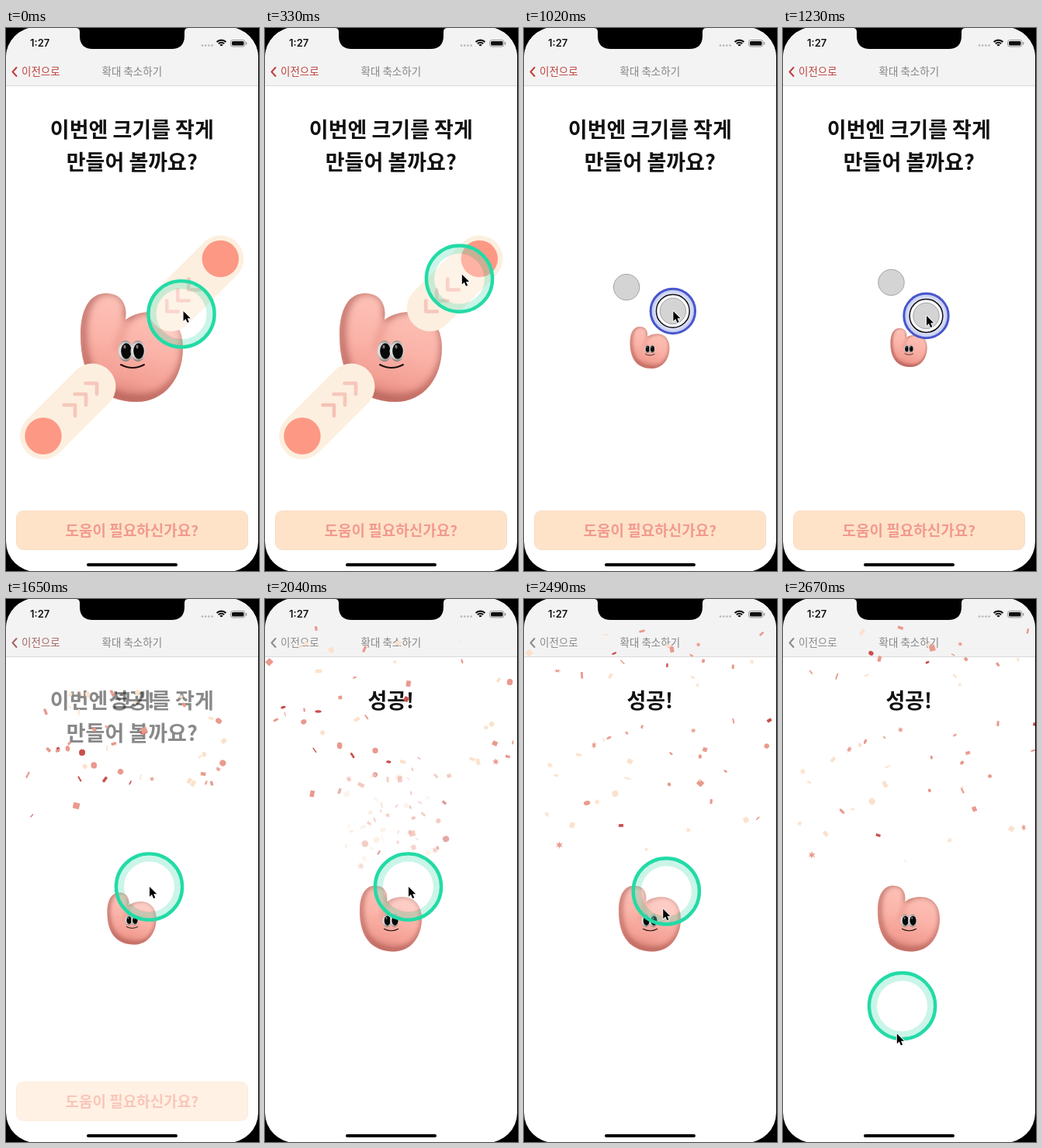
These frames come from a looping animation (326 by 700 pixels, 2.7 s). An HTML page with a canvas:

```html
<!DOCTYPE html>
<html lang="ko">
<head>
<meta charset="utf-8">
<style>
html, body { margin: 0; width: 100%; height: 100%; overflow: hidden; background: #000; }
canvas { display: block; }
</style>
</head>
<body>
<canvas id="stage" width="326" height="700"></canvas>
<script>
const ctx = document.getElementById('stage').getContext('2d');
const LOOP = 2700, TAU = Math.PI * 2;
const KOREAN = '"Noto Sans CJK KR", "Noto Sans CJK", sans-serif';
const PIVOT = { x: 162, y: 349.5 };

const clamp = v => Math.max(0, Math.min(1, v));
const mix = (a, b, p) => a + (b - a) * p;
const ramp = (t, from, to) => clamp((t - from) / (to - from));
const ease = p => p < .5 ? 2 * p * p : 1 - 2 * (1 - p) ** 2;

function random(seed) {
  return () => {
    seed = (seed * 1664525 + 1013904223) >>> 0;
    return seed / 4294967296;
  };
}

function circle(x, y, r, fill, stroke, width = 1) {
  ctx.beginPath();
  ctx.arc(x, y, r, 0, TAU);
  if (fill) { ctx.fillStyle = fill; ctx.fill(); }
  if (stroke) { ctx.strokeStyle = stroke; ctx.lineWidth = width; ctx.stroke(); }
}

function ellipse(x, y, rx, ry, fill) {
  ctx.beginPath();
  ctx.ellipse(x, y, rx, ry, 0, 0, TAU);
  ctx.fillStyle = fill;
  ctx.fill();
}

function line(points, color, width) {
  ctx.beginPath();
  points.forEach(([x, y]) => ctx.lineTo(x, y));
  ctx.strokeStyle = color;
  ctx.lineWidth = width;
  ctx.lineCap = ctx.lineJoin = 'round';
  ctx.stroke();
}

function box(x, y, w, h, r, fill, stroke) {
  ctx.beginPath();
  ctx.roundRect(x, y, w, h, r);
  if (fill) { ctx.fillStyle = fill; ctx.fill(); }
  if (stroke) { ctx.strokeStyle = stroke; ctx.lineWidth = 1; ctx.stroke(); }
}

function text(str, x, y, font, color, align = 'center') {
  ctx.font = font;
  ctx.fillStyle = color;
  ctx.textAlign = align;
  ctx.fillText(str, x, y);
}

function withAlpha(alpha, draw) {
  if (alpha <= 0) return;
  ctx.save();
  ctx.globalAlpha = alpha;
  draw();
  ctx.restore();
}

// Pointer path: up to the handle, pinch in, then away at the end.
const moves = [
  [-150, 480, 257, 311],
  [680, 1120, 184.5, 371],
  [2400, 2750, 142, 582],
];
function pointer(t) {
  let x = 224.3, y = 371.9;
  for (const [from, to, tx, ty] of moves) {
    const p = ease(ramp(t, from, to));
    x = mix(x, tx, p);
    y = mix(y, ty, p);
  }
  return { x, y };
}

function statusBar() {
  text('1:27', 31, 24, '600 13px Inter, sans-serif', '#111', 'left');
  for (let i = 0; i < 4; i++) circle(253 + i * 4.2, 22.5, 1.3, '#b5b5b5');
  for (const r of [3, 6.2, 9.4]) {
    ctx.beginPath();
    ctx.arc(277.5, 24, r - 1, -Math.PI * .75, -Math.PI * .25);
    ctx.strokeStyle = '#111';
    ctx.lineWidth = 2.1;
    ctx.lineCap = 'butt';
    ctx.stroke();
  }
  box(289.5, 15.5, 18.5, 8.5, 2.8, null, '#999');
  box(291, 17, 15.5, 5.5, 1.5, '#111');
  box(309, 18, 1.3, 3.5, .6, '#999');
}

function navBar(done) {
  ctx.fillStyle = '#f4f3f4';
  ctx.fillRect(0, 0, 325, 74);
  ctx.fillStyle = '#dad9da';
  ctx.fillRect(0, 74, 325, 1);
  const color = `rgb(${mix(190, 138, done)},${mix(66, 138, done)},${mix(58, 138, done)})`;
  line([[13.5, 51], [8.5, 56.5], [13.5, 62]], color, 2);
  text('이전으로', 20, 61.3, '400 13.5px ' + KOREAN, color, 'left');
  text('확대 축소하기', 162.3, 61.3, '500 13.5px ' + KOREAN, '#858585');
}

function titles(done) {
  const font = '700 27px ' + KOREAN;
  withAlpha(1 - done, () => {
    text('이번엔 크기를 작게', 162.3, 141, font, '#111');
    text('만들어 볼까요?', 162.3, 183, font, '#111');
    box(13.5, 622.5, 298, 50, 9, '#fee3c9', '#f6dcc6');
    text('도움이 필요하신가요?', 162.3, 655, '700 19px ' + KOREAN, '#f29a8e');
  });
  withAlpha(done, () => text('성공!', 162.3, 141, font, '#111'));
}

const body = new Path2D('M-66-16C-66-50-54-70-33-70C-14-70-5-56-8-36C4-44 15-46 25-46C50-46 66-28 66 0C66 40 42 70 6 70C-40 70-66 40-66-16Z');
const crease = new Path2D('M-3-44Q-12-22-20 4');

function shaded(gradient, ...stops) {
  stops.forEach(([at, color]) => gradient.addColorStop(at, color));
  return gradient;
}
const radial = (x, y, r0, r1, ...stops) =>
  shaded(ctx.createRadialGradient(x, y, r0, x, y, r1), ...stops);

function softStroke(path, color, width, blur) {
  ctx.filter = `blur(${blur}px)`;
  ctx.strokeStyle = color;
  ctx.lineWidth = width;
  ctx.stroke(path);
  ctx.filter = 'none';
}

function mascot(scale) {
  ctx.save();
  ctx.translate(162, 412);
  ctx.scale(scale, scale);
  ctx.fillStyle = shaded(ctx.createLinearGradient(22, -60, -14, 74),
    [0, '#fdc3b9'], [.45, '#fbb3a8'], [.75, '#f39f94'], [1, '#d67b72']);
  ctx.fill(body);
  ctx.save();
  ctx.clip(body);
  softStroke(crease, 'rgba(214,120,108,.4)', 8, 5 * scale);
  ctx.translate(3, -4);
  softStroke(body, 'rgba(168,88,80,.8)', 9, 5 * scale);
  ctx.restore();
  for (const x of [-8, 8]) {
    ellipse(x, 4.5, 9.5, 13.5, radial(x, 4, 5, 13, [0, '#eee'], [.6, '#cfcfcf'], [1, '#8c8582']));
    ellipse(x + 1, 4.5, 6.8, 10.2, '#080808');
    ellipse(x - 1, -1, 1.6, 2.4, '#777');
  }
  ctx.beginPath();
  ctx.moveTo(-14, 22);
  ctx.quadraticCurveTo(1, 30, 16, 22);
  ctx.strokeStyle = '#1a0e0c';
  ctx.lineWidth = 2;
  ctx.lineCap = 'round';
  ctx.stroke();
  ctx.restore();
}

// One handle; the second is the same shape turned half round.
function handle(x, y, turn, t) {
  ctx.save();
  ctx.translate(x, y);
  ctx.rotate(turn);
  line([[0, 0], [63.5, -63.5]], '#fdefdf', 60);
  circle(0, 0, 23.7, '#fd9884');
  for (let i = 0; i < 3; i++) {
    const cx = 41 + i * 14, cy = -40 - i * 14;
    const glow = Math.exp(-(((t - 740 - i * 190) / 230) ** 2));
    withAlpha(.25 + .75 * glow, () =>
      line([[cx - 14.5, cy], [cx, cy], [cx, cy + 14]], '#e0504f', 4.6));
  }
  ctx.restore();
}

function burst(seed, count, birth, top, bottom) {
  const rnd = random(seed);
  return Array.from({ length: count }, () => ({
    birth: birth + (rnd() - .5) * 50,
    dx: (rnd() - .5) * 400,
    dy: -mix(bottom, top, rnd() ** .7),
    size: mix(2.3, 4.3, rnd()),
    kind: Math.floor(rnd() * 4),
    color: ['#c9504b', '#e99a8c', '#fbe2cd', '#fbe2cd', '#e99a8c'][Math.floor(rnd() * 5)],
    angle: rnd() * TAU,
    spin: (rnd() - .5) * .012,
    flip: rnd() * .008,
  }));
}
const confetti = [...burst(7, 46, 1370, 400, 130), ...burst(41, 56, 1930, 400, 60)];

function piece(p, t) {
  const age = t - p.birth;
  if (age <= 0) return;
  const spread = 1 - Math.exp(-age / 260);
  const fade = ramp(age, 0, 240) * (1 - ramp(age, 770, 960));
  withAlpha(fade, () => {
    ctx.translate(162 + p.dx * spread, 368 + p.dy * spread + 8e-5 * age * age);
    ctx.rotate(p.angle + p.spin * age);
    ctx.scale(1, mix(.25, 1, Math.abs(Math.cos(p.angle + p.flip * age))));
    ctx.fillStyle = p.color;
    ctx.beginPath();
    if (p.kind === 0) {
      ctx.arc(0, 0, p.size, 0, TAU);
    } else if (p.kind === 1) {
      for (let i = 0; i < 12; i++) {
        const r = p.size * (i % 2 ? .5 : 1.25), a = i * TAU / 12;
        ctx.lineTo(r * Math.cos(a), r * Math.sin(a));
      }
    } else {
      const h = p.kind === 2 ? p.size : p.size * .6;
      ctx.rect(-p.size, -h, p.size * 2, h * 2);
    }
    ctx.fill();
  });
}

function touchDot(x, y) {
  circle(x, y, 16.7, 'rgba(205,205,205,.85)', '#a3a3a3');
}

function pressedRing({ x, y }) {
  circle(x, y, 28.7, radial(x, y, 17, 29, [0, 'rgba(255,255,255,.75)'], [.35, 'rgba(225,229,250,.8)'], [1, 'rgba(150,162,228,.65)']), '#4856cc', 3);
  circle(x, y, 21.4, 'rgba(255,255,255,.4)', '#111', 1.5);
  touchDot(x, y);
}

function idleRing({ x, y }) {
  circle(x, y, 32, 'rgba(255,255,255,.25)');
  circle(x, y, 37, null, 'rgba(90,225,185,.32)', 9);
  circle(x, y, 42.6, null, '#22dba6', 4.4);
}

const arrow = new Path2D('M0 0V14.5L3.4 11.4L5.8 17L8.3 16L5.9 10.5H10.5Z');
function cursor({ x, y }) {
  ctx.save();
  ctx.translate(x + .5, y);
  ctx.scale(.88, .88);
  ctx.strokeStyle = '#fff';
  ctx.lineWidth = 2;
  ctx.lineJoin = 'round';
  ctx.stroke(arrow);
  ctx.fillStyle = '#000';
  ctx.fill(arrow);
  ctx.restore();
}

const notch = new Path2D('M90 0Q95 0 95 5V10Q95 27 112 27H213Q230 27 230 10V5Q230 0 235 0Z');

function draw(t) {
  const done = ease(ramp(t, 1450, 1850));
  const pos = pointer(t);
  const pinching = t >= 510 && t < 1450;
  const reach = Math.hypot(pos.x - PIVOT.x, pos.y - PIVOT.y);
  const scale = t < 1450 ? Math.min(1, t < 510 ? 1 : reach / 87) : mix(.35, .606, done);

  ctx.fillStyle = '#000';
  ctx.fillRect(0, 0, 326, 700);
  ctx.save();
  ctx.beginPath();
  ctx.roundRect(0, -1, 325, 702, 39);
  ctx.clip();
  ctx.fillStyle = '#fff';
  ctx.fillRect(0, 0, 325, 701);
  navBar(done);
  statusBar();
  titles(done);
  mascot(scale);
  withAlpha(1 - ramp(t, 850, 950), () => {
    handle(48, 526, 0, t);
    handle(276.3, 297.5, Math.PI, t);
  });
  confetti.forEach(p => piece(p, t));
  box(104, 690, 117, 4, 2, '#000');
  ctx.fillStyle = '#000';
  ctx.fill(notch);
  if (pinching) {
    touchDot(2 * PIVOT.x - pos.x, 2 * PIVOT.y - pos.y);
    pressedRing(pos);
  } else {
    idleRing(pointer(t - 50));
  }
  cursor(pos);
  ctx.restore();
}

function frame() {
  draw(performance.now() % LOOP);
  requestAnimationFrame(frame);
}
frame();
</script>
</body>
</html>
```
